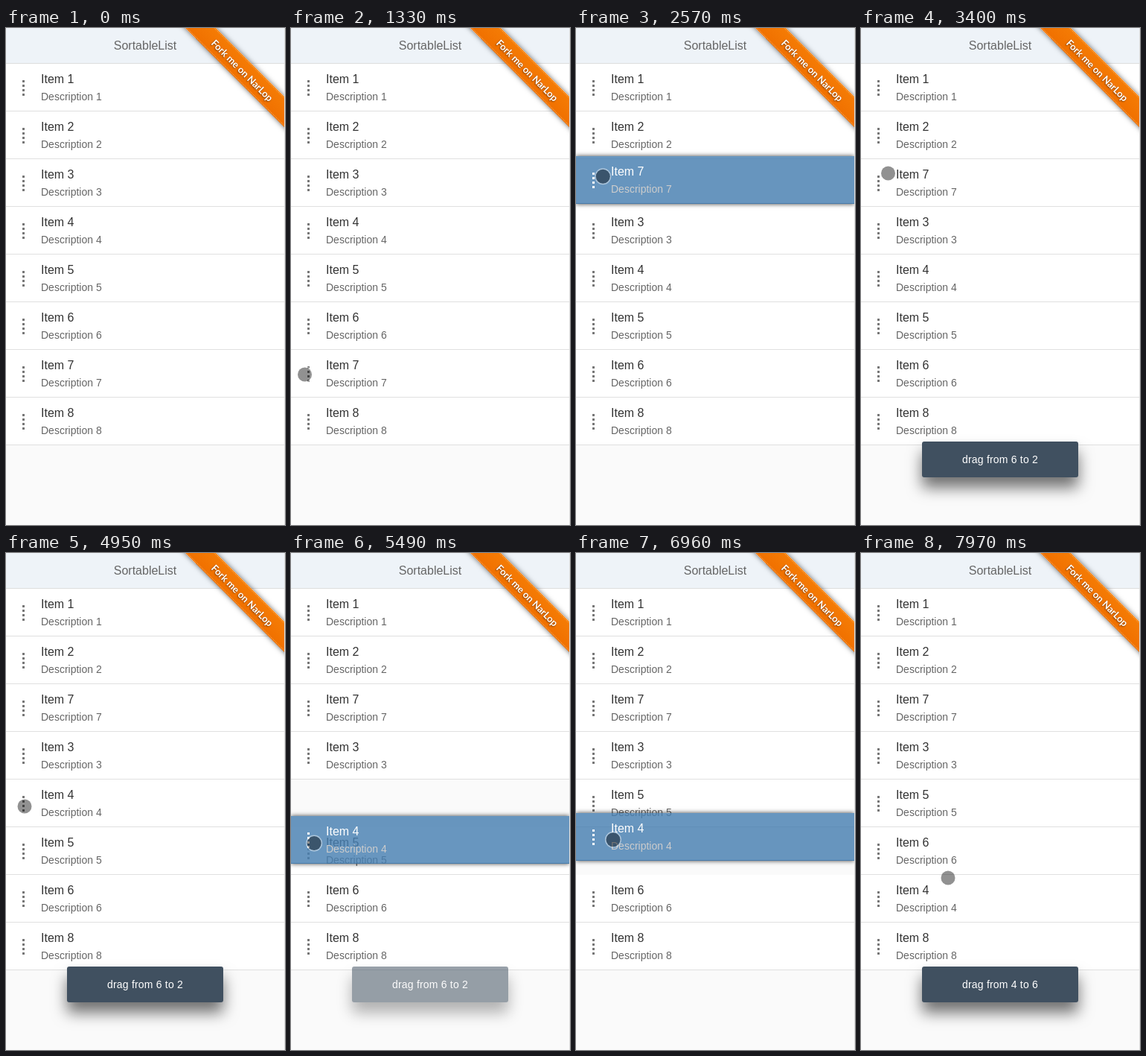
An HTML page for the animation above (8000 ms loop, 375 by 667 pixels).

```html
<!DOCTYPE html>
<html lang="en">
<head>
<meta charset="utf-8">
<title>SortableList</title>
<style>
  html, body { margin: 0; width: 100%; height: 100%; overflow: hidden; }
  body { position: relative; background: #fafafa; font-family: "Liberation Sans", Arial, sans-serif; }
  #app {
    position: absolute; left: 0; top: 0; width: 374px; height: 667px;
    overflow: hidden; border-right: 1px solid #e0e0e0;
  }
  header {
    height: 47px; line-height: 47px; text-align: center; font-size: 16px;
    color: #666; background: #eef3f8; border-bottom: 1px solid #ddd;
  }
  .row {
    position: absolute; left: 0; top: 0; width: 374px; height: 63px;
    background: #fff; border-bottom: 1px solid #e0e0e0; color: #333;
  }
  .row b, .row span { position: absolute; left: 47px; font-weight: 400; white-space: nowrap; }
  .row b { top: 9px; font-size: 16px; line-height: 24px; }
  .row span { top: 34px; font-size: 14px; line-height: 20px; color: #666; }
  .row i {
    position: absolute; left: 22px; top: 22px; width: 3px; height: 21px;
    background: repeating-linear-gradient(#777 0 3px, transparent 3px 6px);
  }
  .row.drag {
    z-index: 2; color: #fff; background: rgba(71, 127, 177, .82);
    border-color: rgba(50, 105, 155, .6); box-shadow: 0 0 6px rgba(0, 0, 0, .75);
  }
  .row.drag span { color: #ccc; }
  .row.drag i { background: repeating-linear-gradient(#fff 0 3px, transparent 3px 6px); }

  #ribbon {
    position: absolute; z-index: 3; left: 198px; top: 42px; width: 240px; height: 29px;
    transform: rotate(45deg); background: linear-gradient(#f57c05, #f07000);
    box-shadow: 0 0 7px rgba(0, 0, 0, .6);
    color: #fff; font: 700 13px/30px Lato, sans-serif; text-align: center;
    text-shadow: 0 1px 2px rgba(0, 0, 0, .55);
  }
  #ribbon::before {
    content: ""; position: absolute; inset: 1px 0;
    border: dotted rgba(255, 215, 165, .5); border-width: 1px 0;
  }
  #toast {
    position: absolute; z-index: 4; left: 82px; top: 555px; width: 210px; height: 48px;
    border-radius: 3px; background: #405060; color: #fff;
    box-shadow: 0 14px 20px rgba(0, 0, 0, .55);
    font-size: 14px; letter-spacing: .2px; line-height: 48px; text-align: center;
  }
  #dot {
    position: absolute; z-index: 5; left: -9.5px; top: -9.5px; width: 19px; height: 19px;
    border-radius: 50%; background: rgba(0, 0, 0, .43);
  }
  #dot.down { box-shadow: 0 0 0 1.5px rgba(255, 255, 255, .45); }
</style>
</head>
<body>
<div id="app">
  <header>SortableList</header>
  <div id="ribbon">Fork me on NarLop</div>
  <div id="toast"></div>
  <div id="dot"></div>
</div>
<script>
  // Time runs in ticks of the screen's refresh
  const LOOP = 8000, TICK = 77.3, LAST = 103, HEAD = 48, ROW = 64, FADE = 10.8;
  const app = document.getElementById('app');
  const toast = document.getElementById('toast');
  const dot = document.getElementById('dot');

  const rows = Array.from({ length: 8 }, (_, i) => {
    const el = document.createElement('div');
    el.innerHTML = `<i></i><b>Item ${i + 1}</b><span>Description ${i + 1}</span>`;
    return app.appendChild(el);
  });

  // Eased pointer moves: start tick, end tick, destination
  const home = [36, 592];
  const moves = [
    [9, 10, 10.5, 474.5],
    [10, 15, 18, 464.5],
    [18, 34.2, 36, 194.5],
    [47, 54, 51, 405.5],
    [54, 58, 24.5, 344.5],
    [58, 63, 24.5, 339.5],
    [66, 79, 43, 489.5],
    [83, 89, 49.4, 377],
    [89, 95, 50.5, 476],
    [101, 103, 116.5, 435.5]
  ];

  // lag: how far the row trails the pointer; grip: where the pointer holds it
  const drags = [
    { from: 6, start: 19, end: 44, lag: .8, grip: 33.5 },
    { from: 4, start: 67, end: 99, lag: 0, grip: 35.5 }
  ];

  const clamp = u => Math.max(0, Math.min(1, u));
  const ease = u => u * u * (3 - 2 * u);

  function pointer(k) {
    let [x, y] = home;
    for (const [start, end, toX, toY] of moves) {
      const v = ease(clamp((k - start) / (end - start)));
      x += (toX - x) * v;
      y += (toY - y) * v;
    }
    return [x, y];
  }

  const dragTop = (d, k) => pointer(k - d.lag)[1] - d.grip;

  // A neighbour gives way once the dragged row fully covers its place
  function slotAt(d, k) {
    let slot = d.from;
    for (let i = d.start; i <= Math.min(k, d.end - 1); i++) {
      const p = (dragTop(d, i) - HEAD) / ROW;
      if (p <= slot - 1) slot = Math.ceil(p);
      else if (p >= slot + 1) slot = Math.floor(p);
    }
    return slot;
  }

  function draw(k) {
    const order = rows.slice();
    let held = null, heldTop = 0, down = false, alpha = 0;
    for (const d of drags) {
      if (k >= d.start - 2 && k < d.end) down = true;
      if (k < d.start) continue;
      const slot = slotAt(d, k);
      const [row] = order.splice(d.from, 1);
      order.splice(slot, 0, row);
      if (k < d.end) {
        held = row;
        heldTop = dragTop(d, k);
      } else {
        alpha = clamp(1 - (k - d.end - 22) / FADE);
        toast.textContent = `drag from ${d.from} to ${slot}`;
      }
    }
    order.forEach((row, i) => {
      const y = row === held ? Math.round(heldTop) : HEAD + i * ROW;
      row.className = row === held ? 'row drag' : 'row';
      row.style.transform = `translateY(${y}px)`;
    });
    toast.style.opacity = alpha;
    const [x, y] = pointer(k);
    dot.className = down ? 'down' : '';
    dot.style.visibility = k === 5 || k >= 10 ? 'visible' : 'hidden';
    dot.style.transform = `translate(${x}px, ${y}px)`;
  }

  const t0 = performance.now();
  function frame() {
    const t = (performance.now() - t0) % LOOP;
    draw(Math.min(LAST, Math.floor((t + 8) / TICK)));
    requestAnimationFrame(frame);
  }
  frame();
</script>
</body>
</html>
```
